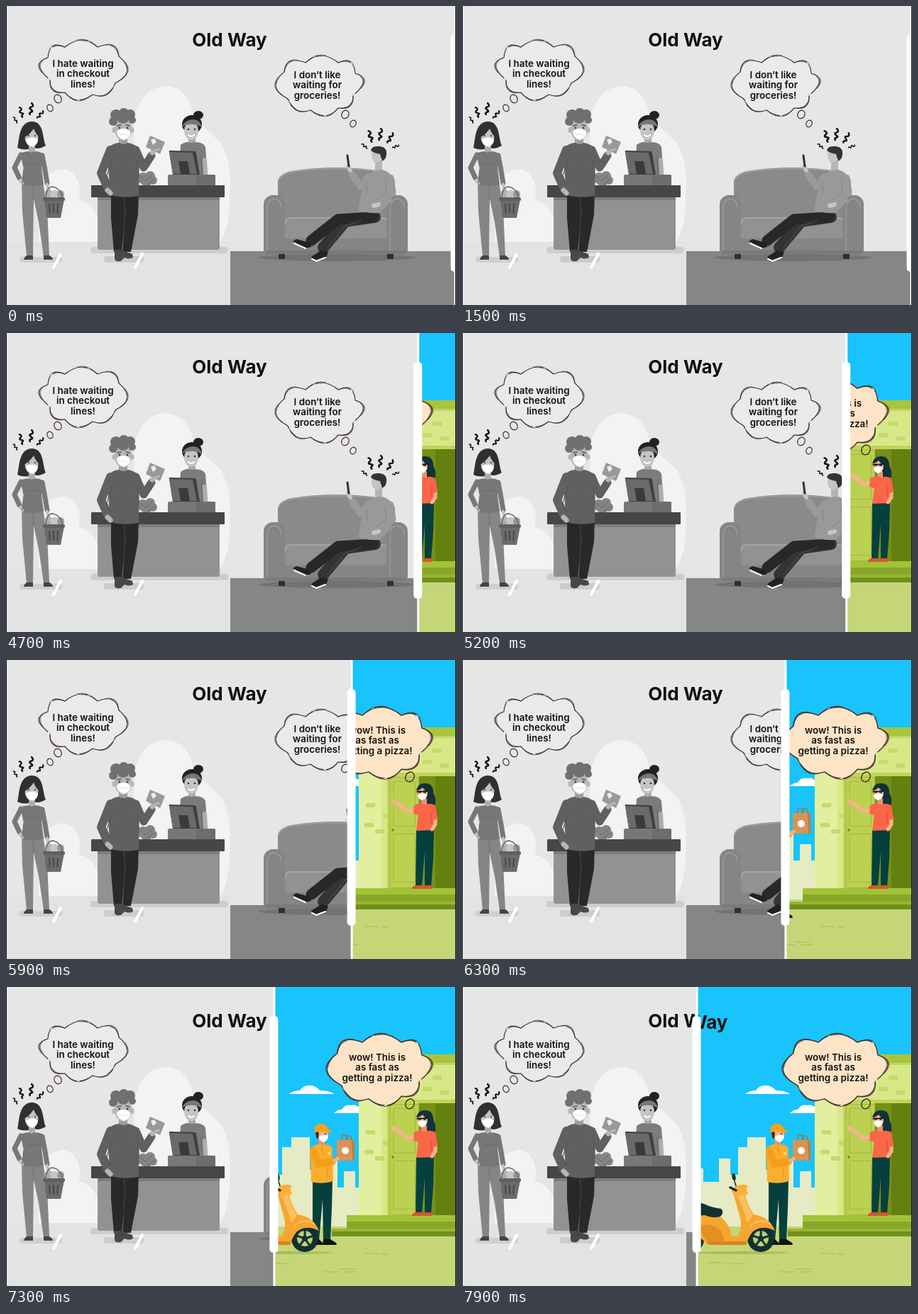
Write an HTML page with a canvas that moves like this. It is 634 by 422 pixels and loops after 8000 ms.

```html
<!DOCTYPE html>
<html lang="en">
<head>
<meta charset="utf-8">
<title>Old Way, New Way</title>
<style>
html, body { margin: 0; width: 100%; height: 100%; overflow: hidden; background: #e6e6e6; }
canvas { display: block; width: 634px; height: 422px; }
</style>
</head>
<body>
<canvas id="stage" width="634" height="422"></canvas>
<script>
const W = 634, H = 422, LOOP = 8000, STEP = 100;
const stage = document.getElementById('stage').getContext('2d');
let g = stage;

function fill(color, d) {
  g.fillStyle = color;
  g.fill(new Path2D(d));
}
function line(color, width, d) {
  g.strokeStyle = color;
  g.lineWidth = width;
  g.lineCap = g.lineJoin = 'round';
  g.stroke(new Path2D(d));
}
function rect(color, x, y, w, h, r = 0) {
  g.fillStyle = color;
  g.beginPath();
  g.roundRect(x, y, w, h, r);
  g.fill();
}
function oval(color, x, y, rx, ry = rx, turn = 0) {
  g.fillStyle = color;
  g.beginPath();
  g.ellipse(x, y, rx, ry, turn, 0, Math.PI * 2);
  g.fill();
}
function ring(color, width, x, y, rx, ry, turn) {
  g.strokeStyle = color;
  g.lineWidth = width;
  g.beginPath();
  g.ellipse(x, y, rx, ry, turn, 0, Math.PI * 2);
  g.stroke();
}
function label(text, x, y, size, weight) {
  g.fillStyle = '#111';
  g.font = `${weight} ${size}px Inter, "Open Sans", sans-serif`;
  g.textAlign = 'center';
  g.textBaseline = 'alphabetic';
  g.fillText(text, x, y);
}

// Each lobe of the thought cloud: start corner, then the outermost point.
const lobes = [
  [14, 24, 23, 9], [44, 11, 66, 1], [90, 11, 107, 10], [114, 26, 126, 38],
  [111, 57, 106, 72], [90, 75, 72, 86], [51, 78, 32, 78], [19, 62, 2, 44]
];
function cloudPath(grow) {
  const path = new Path2D();
  const fix = (v, c) => c + (v - c) * grow;
  lobes.forEach(([x, y, mx, my], i) => {
    const [nx, ny] = lobes[(i + 1) % lobes.length];
    if (!i) path.moveTo(x, y);
    path.quadraticCurveTo(fix(2 * mx - (x + nx) / 2, 64), fix(2 * my - (y + ny) / 2, 45), nx, ny);
  });
  path.closePath();
  return path;
}
function bubble(x, y, scale, flip, color, tails, lines, tx, ty) {
  const ink = '#44312b';
  g.save();
  g.translate(flip ? x + 128 * scale : x, y);
  g.scale(flip ? -scale : scale, scale);
  for (let i = 0; i < tails; i++) ring(ink, 1.2, 100 + 11 * i, 84 + 13 * i, 5 - i, 6 - i, .5);
  g.fillStyle = color;
  g.fill(cloudPath(1));
  g.strokeStyle = ink;
  g.lineJoin = 'round';
  for (const [grow, width, dash] of [[1, 1.2, [52, 5]], [1.04, .7, [30, 14]], [.97, .5, [20, 24]]]) {
    g.lineWidth = width;
    g.setLineDash(dash);
    g.stroke(cloudPath(grow));
  }
  g.restore();
  lines.forEach((s, i) => label(s, tx, ty + i * 14.5, 13.4, 600));
}

function squiggle(x, y, turn, size) {
  g.save();
  g.translate(x, y);
  g.rotate(turn);
  g.scale(size, size);
  line('#111', 2.6, 'M0 -8Q4 -5 1 -3Q-4 -1 0 1Q4 3 2 4Q-2 6 0 8');
  g.restore();
}
function slash(x) {
  line('#fff', 4, `M${x} 350L${x - 10} 369`);
}

function queueWoman() {
  rect('#cfcfcf', 19, 354, 60, 8, 4);
  fill('#303030', 'M16 200C19 191 17 164 36 163C54 163 51 186 56 197Q46 203 40 200Q26 205 16 200Z');
  rect('#adadad', 32, 194, 9, 14, 3);
  oval('#c3c3c3', 36, 185, 9.5, 13.5);
  fill('#303030', 'M25 186Q25 168 37 167Q48 168 47 185Q42 181 39 173Q33 182 25 186Z');
  oval('#333', 32, 183, 1.1);
  oval('#333', 41, 183, 1.1);
  fill('#fff', 'M28 188Q37 183 45 188Q45 196 37 199Q29 196 28 188Z');
  fill('#858585', 'M22 247L52 247L58 285L61 353L53 353L46 305L39 272L38 353L29 353L23 290Z');
  line('#707070', 1, 'M38 252L39 272');
  fill('#777', 'M20 208Q31 203 36 207Q43 203 52 208L50 228L53 252Q37 256 22 252L25 230Z');
  line('#777', 7, 'M21 210L12 228L19 243');
  line('#777', 7, 'M51 211L55 232L58 250');
  line('#c0c0c0', 4.5, 'M20 246L23 250M58 252L60 260');
  line('#666', 1, 'M28 221Q37 226 47 221M25 230L23 250');
  fill('#444', 'M29 352L38 352L38 358L25 358Q26 354 29 352ZM53 352L61 352Q66 355 66 358L53 358Z');
  oval('#b0b0b0', 60, 265, 6);
  oval('#c6c6c6', 69, 265, 7, 5);
  oval('#999', 77, 266, 5, 6);
  line('#666', 1.5, 'M56 271Q57 256 65 255Q76 256 80 271');
  fill('#6b6b6b', 'M54 273L82 273L77 299L57 299Z');
  rect('#606060', 52, 270, 31, 5, 2);
  for (let x = 61; x < 78; x += 6) line('#484848', 2, `M${x} 280L${x + (68 - x) * .12} 292`);
  slash(77);
}

function cashier() {
  oval('#222', 271, 154, 7, 6);
  oval('#222', 262, 167, 14, 13);
  rect('#aaa', 257, 181, 10, 14, 3);
  oval('#c4c4c4', 261, 176, 10, 13);
  fill('#777', 'M248 170Q253 160 264 160Q274 161 276 171Q262 163 248 170Z');
  oval('#222', 257, 174, 1.2);
  oval('#222', 266, 174, 1.2);
  line('#fff', 2, 'M257 182Q261 186 265 182');
  fill('#7c7c7c', 'M246 196Q254 190 261 193Q277 190 281 199L284 240L243 240Z');
  line('#adadad', 6, 'M280 217L281 236');
  line('#696969', 1, 'M275 212L276 238');
}

function counter() {
  rect('#cdcdcd', 119, 340, 194, 9, 4);
  rect('#929292', 129, 268, 172, 76, 3);
  rect('#7d7d7d', 129, 268, 172, 6);
  for (const [x, y, r] of [[193, 243, 8], [203, 240, 7], [207, 246, 6], [198, 247, 8]]) oval('#858585', x, y, r);
  line('#666', 1, 'M190 241L197 247L206 238M199 252L209 244');
  rect('#777', 228, 238, 67, 16, 2);
  rect('#6d6d6d', 268, 238, 27, 16, 2);
  fill('#3f3f3f', 'M230 206Q229 204 231 204L265 205Q268 205 268 208L273 238L235 238Z');
  fill('#6a6a6a', 'M230 206L263 207L269 237L235 237Z');
  fill('#3a3a3a', 'M243 219L256 219L259 237L246 237Z');
  rect('#464646', 120, 253, 188, 17, 1);
}

function queueMan() {
  rect('#cccccc', 138, 353, 56, 9, 4);
  rect('#9d9d9d', 159, 183, 12, 16, 4);
  oval('#b6b6b6', 165, 173, 12, 17);
  oval('#b6b6b6', 152, 175, 2.5, 4);
  oval('#b6b6b6', 178, 175, 2.5, 4);
  for (const [x, y, r] of [[151, 163, 6], [155, 154, 8], [166, 151, 7], [175, 153, 7], [178, 161, 5], [165, 157, 9]])
    oval('#707070', x, y, r);
  line('#555', 1.4, 'M157 169L162 168M169 168L174 169');
  oval('#333', 160, 172, 1.3);
  oval('#333', 171, 172, 1.3);
  fill('#fff', 'M156 177Q165 169 175 177Q176 186 166 189Q156 186 156 177Z');
  line('#ddd', 1, 'M159 181L172 181');
  fill('#292929', 'M148 262L187 262L186 295L176 347L164 347L167 312L163 347L152 347L148 300Z');
  line('#4a4a4a', 1, 'M166 270L168 292L166 312');
  fill('#484848', 'M153 344L164 344L169 347L178 350L179 355Q173 358 167 355L162 360Q152 362 153 355Z');
  fill('#606060', 'M142 203Q148 194 159 193Q166 197 172 193Q184 195 188 204L187 268Q167 272 147 267Z');
  line('#606060', 12, 'M147 203L134 236L143 256');
  line('#606060', 11, 'M183 203L194 228L205 211');
  line('#515151', 1, 'M149 218L142 239L147 252M185 218L187 240');
  line('#b6b6b6', 7, 'M143 260L147 264M206 207L210 202');
  fill('#999', 'M203 183L224 192L217 209L197 199Z');
  fill('#eee', 'M204 189L209 187L212 192L207 196Z');
  line('#b6b6b6', 3, 'M205 206L215 202');
  slash(192);
}

function sofa() {
  oval('#737373', 466, 355, 110, 5);
  rect('#303030', 384, 349, 9, 8);
  rect('#303030', 537, 349, 9, 8);
  fill('#8a8a8a', 'M383 270L383 248Q384 237 402 233Q465 223 529 233Q547 237 548 248L549 300L383 300Z');
  line('#a0a0a0', 1.3, 'M384 246Q388 237 404 234Q465 225 529 234');
  rect('#858585', 390, 298, 151, 52, 5);
  rect('#929292', 390, 298, 151, 30, 6);
  line('#a9a9a9', 1.3, 'M393 308Q394 299 403 299L530 299Q538 300 538 308');
  for (const x of [363, 536]) {
    rect('#858585', x, 267, 30, 83, [13, 13, 3, 3]);
    line('#9d9d9d', 1.3, `M${x + 5} 345L${x + 5} 284Q${x + 7} 272 ${x + 15} 272Q${x + 24} 273 ${x + 25} 284`);
  }
  rect('#7a7a7a', 366, 345, 198, 5, 2);
}

function sofaMan() {
  rect('#b5b5b5', 520, 217, 10, 16, 3);
  oval('#c5c5c5', 522, 210, 7, 11);
  fill('#333', 'M514 204Q515 197 526 198Q537 199 536 209Q536 216 530 219L527 209Q519 208 514 204Z');
  line('#343434', 16, 'M520 298L478 304L447 341');
  line('#282828', 15, 'M517 298L468 301L430 331');
  line('#555', 1, 'M500 303L478 310L453 341');
  fill('#222', 'M404 332L409 329L428 334L430 340L422 342ZM430 354L444 345L454 347L451 355L434 361Z');
  line('#fff', 2, 'M406 335L422 342M431 357L437 360L450 355');
  fill('#999', 'M507 240Q517 231 530 231Q543 234 546 248L543 276L526 292Q508 293 496 288L501 262Z');
  line('#999', 10, 'M511 241L500 255L488 238');
  line('#c4c4c4', 6, 'M485 232L482 226');
  line('#333', 3, 'M481 211L483 226');
  line('#999', 11, 'M541 243L544 263L526 279');
  line('#858585', 1, 'M534 247L536 263L522 273M507 250L509 264');
  line('#c4c4c4', 6, 'M525 280L518 282');
}

function oldScene() {
  rect('#e6e6e6', 0, 0, W, H);
  rect('#e3e3e3', 0, 333, 316, 89);
  fill('#f3f3f3', 'M46 333L46 260Q55 233 80 230Q102 233 104 260L103 275Q120 276 130 300L130 333Z');
  fill('#f3f3f3', 'M182 333L180 160Q190 115 225 113Q260 115 264 158Q290 180 304 195Q319 224 315 265Q316 310 302 333Z');
  rect('#868686', 316, 346, 318, 76);
  cashier();
  counter();
  queueWoman();
  queueMan();
  sofa();
  sofaMan();
  [[13, 161, -.6, .6], [21, 150, -.3, .9], [35, 145, .15, 1], [48, 153, .7, .8],
   [505, 198, -.9, .6], [513, 184, -.3, 1], [527, 181, .15, 1], [541, 186, .5, .95], [549, 198, 1.2, .6]]
    .forEach(s => squiggle(...s));
  bubble(45, 47, 1, true, '#eaeaea', 2, ['I hate waiting', 'in checkout', 'lines!'], 108.5, 85.5);
  bubble(378, 69, 1, false, '#eaeaea', 2, ['I don’t like', 'waiting for', 'groceries!'], 438.5, 101.5);
  label('Old Way', 315, 56.5, 26, 700);
}

function house() {
  rect('#d8e889', 497, 107, 137, 215);
  rect('#e2ef9f', 497, 107, 32, 215);
  rect('#a9c43d', 497, 95, 137, 12);
  rect('#c0d663', 497, 107, 137, 3);
  for (const [x, y] of [[507, 202], [531, 217], [505, 230], [520, 239], [587, 141], [611, 146], [511, 129], [601, 125]])
    rect('#c6da6c', x, y, 13, 6, 1);
  rect('#c2d45a', 537, 159, 97, 163);
  rect('#768f18', 582, 164, 52, 158);
  rect('#64800f', 605, 164, 29, 158);
  rect('#bcd052', 539, 165, 43, 157);
  g.strokeStyle = '#a3ba3c';
  g.lineWidth = 1;
  g.strokeRect(541.5, 165.5, 40, 156);
  g.strokeRect(546.5, 171.5, 30, 63);
  g.strokeRect(546.5, 245.5, 30, 68);
  oval('#809820', 545, 240, 2);
  rect('#a4c237', 480, 322, 154, 9);
  rect('#86a729', 480, 331, 154, 10);
  rect('#98b632', 459, 341, 175, 4);
  rect('#718f1c', 459, 345, 175, 7);
}

function homeWoman() {
  fill('#12323a', 'M580 190Q577 174 590 174Q602 174 602 187Q609 200 601 213Q592 214 591 202Z');
  rect('#e9916f', 585, 195, 8, 11, 2);
  oval('#fab18d', 587, 187, 7, 11);
  fill('#12323a', 'M578 184Q580 174 591 175Q598 177 597 188Q589 184 587 180Q583 184 578 184Z');
  line('#111', 1.5, 'M579 186L594 185');
  oval('#222', 583, 186, 2.3, 1.8);
  oval('#222', 590, 186, 2.3, 1.8);
  fill('#fff', 'M580 190Q586 187 593 190Q592 196 586 198Q580 196 580 190Z');
  fill('#06403e', 'M578 239L603 239L602 280L599 319L590 319L590 270L586 319L577 319Z');
  fill('#dd5030', 'M576 318L586 318L586 323L571 323Q572 320 576 318ZM590 318L600 318L600 323L587 323Z');
  line('#fab18d', 5, 'M578 211L567 214L554 204L546 199');
  line('#fab18d', 2, 'M548 201L542 196M548 202L543 203');
  fill('#fb6548', 'M575 205Q584 200 590 204Q603 200 606 209L604 240L578 241L581 219L574 217Z');
  line('#fab18d', 5, 'M605 222L605 232L600 239');
  line('#fb6548', 7, 'M602 208L604 222');
  line('#db4f36', 1, 'M599 216L599 231');
}

function courier() {
  rect('#e99369', 440, 214, 9, 11, 2);
  oval('#fab18d', 446, 208, 8, 11);
  fill('#3c2923', 'M436 204L441 205L440 215L437 212Z');
  oval('#222', 450, 207, 1);
  fill('#fff', 'M441 211Q447 207 454 210Q454 216 448 219Q441 217 441 211Z');
  fill('#f8a21c', 'M434 205Q434 193 445 193Q454 194 454 202L459 203L459 206Q447 203 434 205Z');
  fill('#06403c', 'M432 272L460 272L459 312L457 358L447 358L446 300L441 358L432 358Z');
  fill('#111', 'M447 356L457 356L465 361L466 364L446 364ZM432 356L441 356L446 361L446 364L431 364Z');
  fill('#fbad2d', 'M428 228Q436 221 445 222Q457 221 460 228L461 274Q445 279 430 275Z');
  line('#f39f1b', 10, 'M433 231L440 250L460 246');
  line('#fab18d', 5, 'M463 245L470 242');
  line('#e59317', 1, 'M445 224L446 238M452 253L453 271');
  oval('#ffe0a0', 455, 235, 2);
  line('#b66e31', 1.5, 'M473 218L473 212Q473 209 477 209Q481 209 481 217M479 218Q479 209 484 210Q487 211 487 218');
  rect('#d99455', 466, 216, 25, 29, 1);
  fill('#c37c40', 'M487 216L491 216L491 245L488 245Z');
  oval('#fff', 478, 231, 5);
  oval('#fab18d', 467, 242, 3, 2);
}

function wheel(x, y) {
  oval('#12302f', x, y, 19);
  oval('#b9cf7a', x, y, 11);
  for (let a = 0; a < 5; a++) {
    const turn = a * Math.PI * .4 - .3;
    line('#12302f', 3, `M${x} ${y}L${x + 11 * Math.cos(turn)} ${y + 11 * Math.sin(turn)}`);
  }
  oval('#12302f', x, y, 4);
}
function scooter() {
  wheel(322, 356);
  wheel(421, 355);
  fill('#f6a62f', 'M310 323Q345 315 364 324Q378 336 380 351L389 351Q396 340 391 322L383 294L398 290Q402 308 411 321Q434 325 441 344Q424 335 410 345Q403 353 401 363L345 363Q335 349 310 349Z');
  fill('#ffc05c', 'M388 293L397 291Q401 308 410 322L402 332Q397 316 388 293Z');
  fill('#e48f22', 'M325 340Q353 328 366 347L371 363L346 363Q340 345 325 340Z');
  line('#ffc870', 1.5, 'M407 337Q420 325 434 334');
  fill('#12302f', 'M312 306Q329 302 341 306Q350 311 365 313Q370 317 364 324Q352 327 342 322L320 324Z');
  rect('#d88619', 346, 359, 55, 5, 2);
  line('#12302f', 1.5, 'M387 284L383 271');
  fill('#f9af3c', 'M380 287Q385 278 399 279L405 283L402 293L383 295Z');
  line('#12302f', 3.5, 'M378 283L386 287');
  oval('#12302f', 383, 268, 2.5, 5, -.2);
  oval('#ffe6a8', 403, 286, 2, 4, -.2);
}

function newScene() {
  rect('#18c4fb', 0, 0, W, H);
  fill('#fff', 'M399 151Q405 146 414 146Q419 138 429 139Q438 140 442 146Q455 146 462 151Z');
  fill('#fff', 'M462 178Q467 173 473 173Q478 165 486 167Q493 165 499 171L499 178Z');
  // skyline: left edge, top, width
  for (const [x, y, w] of [[318, 256, 22], [340, 275, 22], [362, 242, 16], [378, 265, 12], [389, 226, 13],
    [402, 212, 26], [428, 258, 18], [444, 244, 23], [462, 283, 35], [476, 260, 16]])
    rect('#e6ebc4', x, y, w, 340 - y);
  rect('#c5d678', 0, 338, W, 84);
  line('#a6bd53', 1, 'M505 376L525 376M529 377L538 377M470 398L491 398M448 402L468 402M477 402L495 402M345 389L372 389M377 390L398 390');
  house();
  bubble(450, 65, 1.19, false, '#fde4c7', 1, ['wow! This is', 'as fast as', 'getting a pizza!'], 523, 103.5);
  oval('#aabc59', 393, 375, 66, 2);
  courier();
  scooter();
  homeWoman();
  label('New Way', 315, 58.5, 26, 700);
}

function paint(scene) {
  const c = document.createElement('canvas');
  c.width = W;
  c.height = H;
  g = c.getContext('2d');
  scene();
  return c;
}

const before = paint(oldScene), after = paint(newScene);
g = stage;

function draw(time) {
  const step = Math.floor(time % LOOP / STEP);
  const x = step < 41 ? 632.5 : 627 - 7.8 * (step - 41);
  const cut = Math.round(x);
  g.drawImage(before, 0, 0);
  if (cut < W) g.drawImage(after, cut, 0, W - cut, H, cut, 0, W - cut, H);
  rect('#fff', x - 1, 0, 3, H);
  rect('#fff', x - 6, 41, 12, 334, 5);
  rect('#111', 0, 0, 1, H);
  rect('#111', W - 1, 0, 1, H);
}
const start = performance.now();
function frame() {
  draw(performance.now() - start);
  requestAnimationFrame(frame);
}
frame();
</script>
</body>
</html>
```
